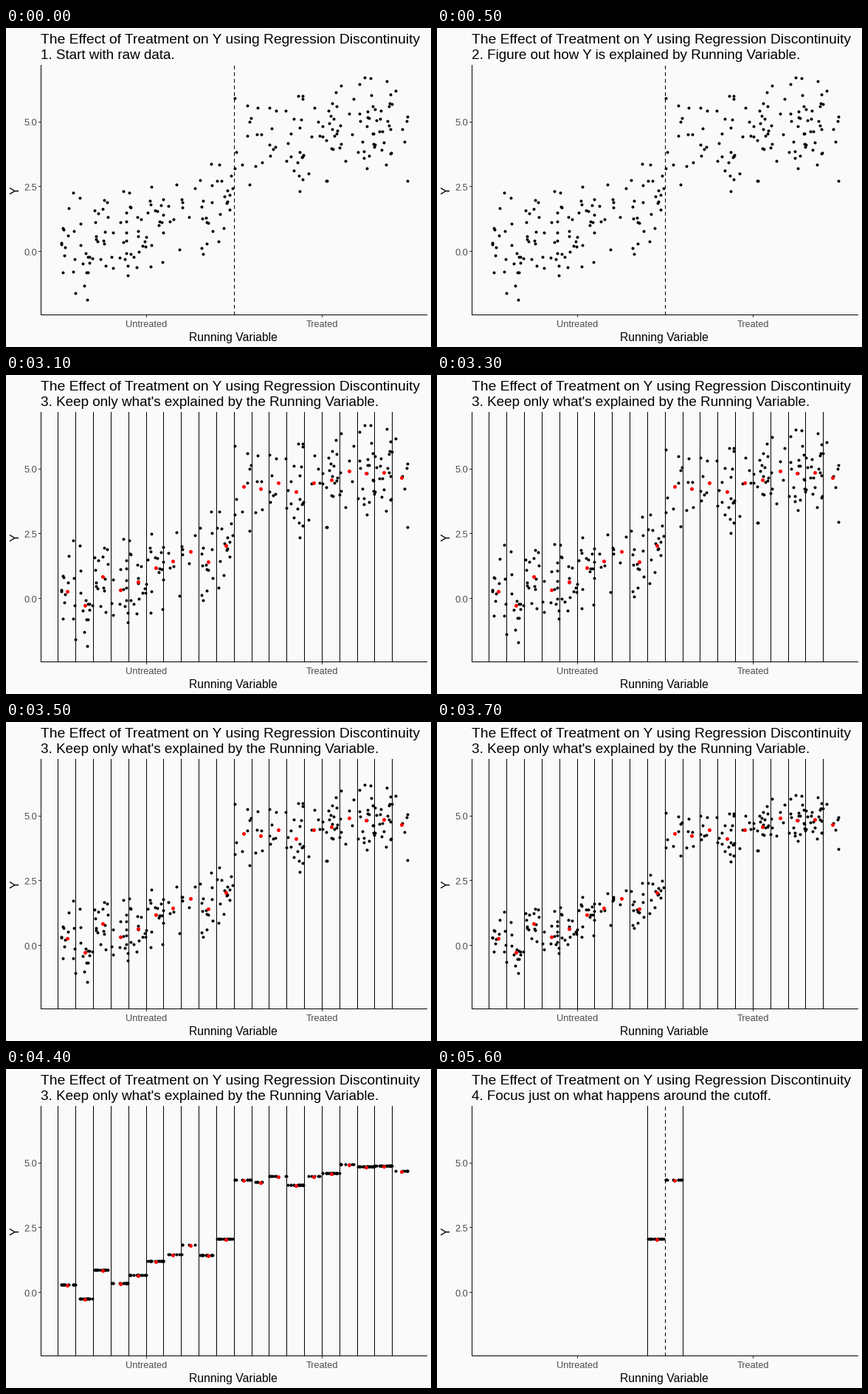
Write a matplotlib script that moves like this. It is 576 px wide and 432 px high and loops after 8 s.

```python
import matplotlib.pyplot as plt
import numpy as np
from matplotlib.animation import FuncAnimation

W, H = 576, 432
STEP_MS, LOOP_MS = 100, 8000
LEFT, RIGHT, TOP, BOTTOM = 47, 570, 50, 388
ZERO_Y, UNIT = 302, 34.9
BIN_START, BIN_WIDTH, BINS = 70.95, 23.83, 20
CUTOFF_BIN = 10
POINT_COUNT, NOISE = 245, 33

STEPS = [
    (0, "1. Start with raw data."),
    (500, "2. Figure out how Y is explained by Running Variable."),
    (3100, "3. Keep only what's explained by the Running Variable."),
    (5600, "4. Focus just on what happens around the cutoff."),
]
BIN_LINES_AT, FOCUS_AT = 1000, 5600
MOVE_START, MOVE_END = 3000, 4400

# Height of each bin's mean on the stage, y downwards
BIN_MEANS = np.array([292, 311, 272, 290, 279, 260, 251, 238, 252, 230,
                      150, 153, 145, 157, 145, 141, 129, 132, 131, 138])


def make_points():
    """Random observations whose average in each bin is the bin's mean."""
    rng = np.random.default_rng(12)
    x = rng.uniform(74, 546, POINT_COUNT)
    bins = ((x - BIN_START) // BIN_WIDTH).astype(int)
    noise = np.clip(rng.normal(0, NOISE, POINT_COUNT), -75, 75)
    offset = np.bincount(bins, noise, BINS) / np.bincount(bins, minlength=BINS)
    return x, noise - offset[bins], bins


x_points, noise, bins = make_points()

plt.rcParams["font.family"] = "Liberation Sans"
fig = plt.figure(figsize=(W / 72, H / 72), dpi=72, facecolor="#FAFAFA")
ax = fig.add_axes([0, 0, 1, 1])
ax.set(xlim=(0, W), ylim=(H, 0))
ax.axis("off")


def line(x0, y0, x1, y1, color="black", **style):
    """One-pixel line through the centres of the given pixels."""
    return ax.plot([x0 + .5, x1 + .5], [y0 + .5, y1 + .5], color=color, lw=1,
                   antialiased=False, snap=False, **style)[0]


def label(x, y, text, size, color="black", **style):
    return ax.text(x, y, text, fontsize=size, color=color, **style)


def dots(x, y, diameter, color, zorder):
    return ax.scatter(x, y, s=diameter ** 2, c=color, linewidths=0,
                      antialiased=False, snap=False, zorder=zorder)


def edge_x(k):
    return int(BIN_START + BIN_WIDTH * k)


# Axes
line(LEFT, TOP, LEFT, BOTTOM)
line(LEFT, BOTTOM, RIGHT, BOTTOM)
for value in (0, 2.5, 5):
    y = int(ZERO_Y - UNIT * value)
    line(LEFT - 3, y, LEFT, y, "#333333", zorder=1)
    label(42.5, y + 5.5, f"{value:.1f}", 12.8, "#4D4D4D", ha="right")
for k, text in [(5, "Untreated"), (15, "Treated")]:
    x = edge_x(k)
    line(x, BOTTOM, x, BOTTOM + 3, "#333333", zorder=1)
    label(x + .3, 405, text, 12.8, "#4D4D4D", ha="center")
label(307.8, 424, "Running Variable", 15.75, ha="center")
label(13.3, 220, "Y", 15.75, rotation=90, ha="center", va="center")
label(47.3, 21, "The Effect of Treatment on Y using Regression Discontinuity",
      19.2)
step_text = label(47.3, 42, "", 18.85)

# Cutoff, bin edges, observations and bin means
cutoff = line(edge_x(CUTOFF_BIN), BOTTOM, edge_x(CUTOFF_BIN), TOP,
              linestyle=(0, (4, 4)), dash_capstyle="butt")
edges = [line(edge_x(k), BOTTOM, edge_x(k), TOP) for k in range(BINS)]
black = dots(x_points, BIN_MEANS[bins] + noise, 4, "black", 3)
mean_x = np.floor(BIN_START + BIN_WIDTH * (np.arange(BINS) + .5)) + .5
means = np.column_stack([mean_x, BIN_MEANS + .5])
red = dots(*means.T, 5, "red", 4)


def update(frame):
    t = frame * STEP_MS
    focus = t >= FOCUS_AT
    binned = t >= BIN_LINES_AT
    step_text.set_text([text for start, text in STEPS if t >= start][-1])

    progress = np.clip((t - MOVE_START) / (MOVE_END - MOVE_START), 0, 1)
    spread = (1 + np.cos(np.pi * progress)) / 2
    y = BIN_MEANS[bins] + noise * spread
    xy = np.round(np.column_stack([x_points, y]))
    near = [CUTOFF_BIN - 1, CUTOFF_BIN]
    black.set_offsets(xy[np.isin(bins, near)] if focus else xy)
    red.set_offsets(means[near] if focus else means)
    red.set_visible(binned)

    cutoff.set_visible(focus or not binned)
    for k, edge in enumerate(edges):
        beside = abs(k - CUTOFF_BIN) == 1
        edge.set_visible(binned and (beside or not focus))
    return black, red, step_text, cutoff, *edges


animation = FuncAnimation(fig, update, frames=LOOP_MS // STEP_MS,
                          interval=STEP_MS, repeat=True, repeat_delay=0)
plt.show()
```
